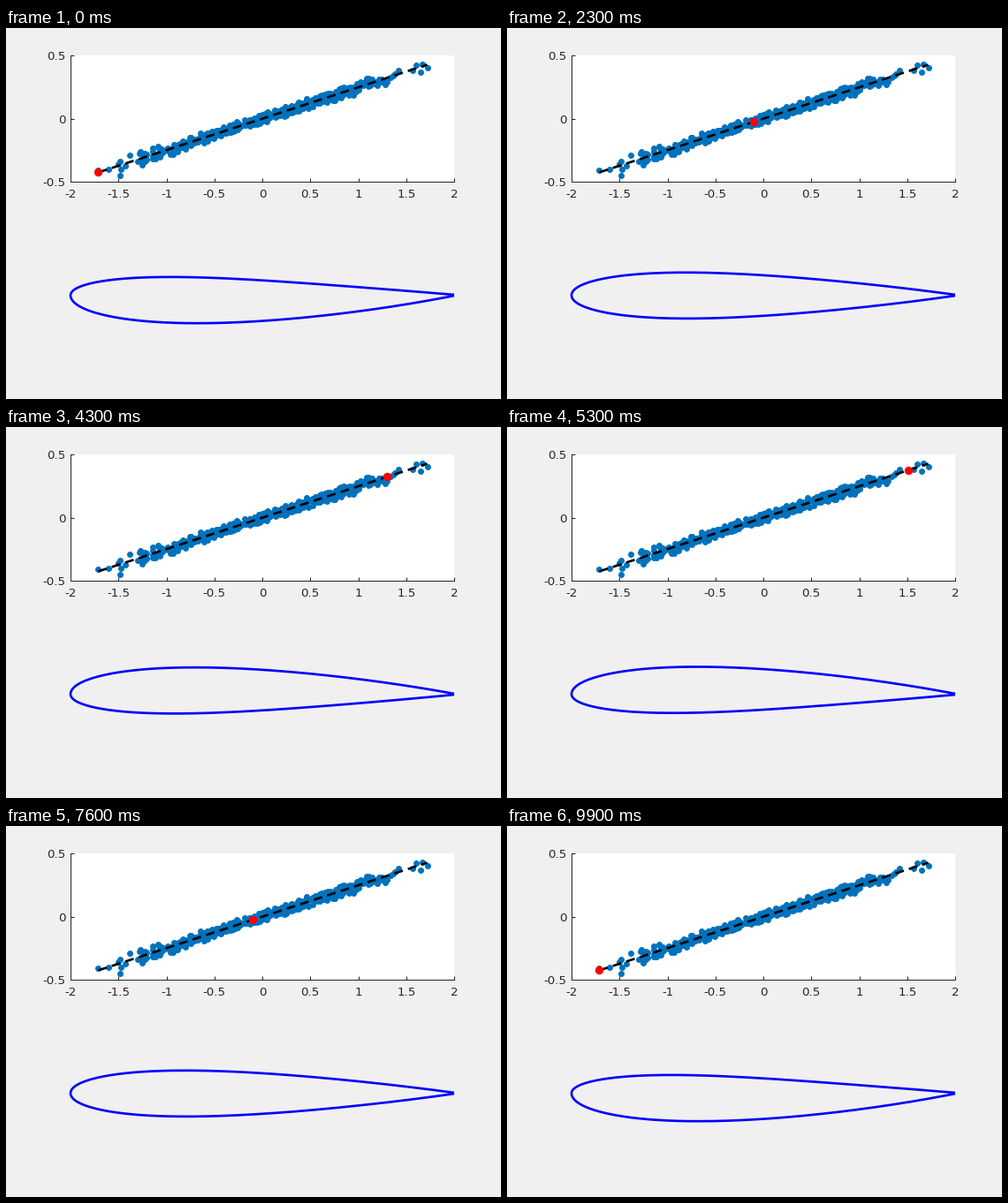
Animation of 560x420 px, one loop 10 s. Source, as a matplotlib script:

```python
import matplotlib.pyplot as plt
import numpy as np
from matplotlib.animation import FuncAnimation

W, H, DPI = 560, 420, 100
PX = 72 / DPI                      # points per pixel
LEFT, CHORD = 73, 434              # shared left edge and width of both plots
SLOPE = 0.248
STEPS = 50
INK = "#262626"

plt.rcParams["font.family"] = "DejaVu Sans"
plt.rcParams["axes.unicode_minus"] = False


def pixel_axes(top, height):
    return fig.add_axes([LEFT / W, 1 - (top + height) / H, CHORD / W, height / H])


def sample_points(count=500):
    """Bounded random cloud around the trend, thinning out towards the ends."""
    rng = np.random.default_rng(7)
    x = np.clip(1.72 * (2 * rng.beta(3, 3, count) - 1), -1.5, 1.5)
    noise = np.clip(rng.normal(0, 1, count), -2.2, 2.2) * (0.016 + 0.007 * np.abs(x))
    tips = [(-1.71, -0.41), (-1.6, -0.4), (-1.48, -0.45), (-1.48, -0.34),
            (1.57, 0.38), (1.6, 0.42), (1.65, 0.37), (1.67, 0.43), (1.72, 0.4)]
    return np.vstack([np.column_stack([x, SLOPE * x + noise]), tips]).T


def airfoil(t):
    """Closed outline of a 12 % thick section whose camber grows with t."""
    x = (1 - np.cos(np.linspace(0, np.pi, 160))) / 2
    half = 0.6 * (0.2969 * np.sqrt(x) - 0.126 * x - 0.3516 * x**2
                  + 0.2843 * x**3 - 0.1015 * x**4)
    camber = t * np.sqrt(x) * (1 - x) * (0.0137 + 0.0195 * x)
    upper, lower = camber + half, camber - half
    return np.r_[x[::-1], x[1:]], np.r_[upper[::-1], lower[1:]]


fig = plt.figure(figsize=(W / DPI, H / DPI), dpi=DPI, facecolor="#f0f0f0")

# Scatter plot with trend line
top = pixel_axes(31, 143.3)
top.set(xlim=(-2, 2), ylim=(-0.5, 0.5))
for axis, ticks in ((top.xaxis, np.linspace(-2, 2, 9)), (top.yaxis, (-0.5, 0, 0.5))):
    axis.set_ticks(ticks, [f"{v:g}" for v in ticks])
top.tick_params(direction="in", length=4.3 * PX, width=PX, color=INK,
                labelcolor=INK, labelsize=13.33 * PX)
top.tick_params(axis="x", pad=8 * PX)
top.tick_params(axis="y", pad=5.5 * PX)
top.spines[["top", "right"]].set_visible(False)
top.spines[["left", "bottom"]].set(linewidth=PX, color=INK)

top.scatter(*sample_points(), s=(7 * PX) ** 2, color="#0072bd", linewidths=0, zorder=3)
ends = np.array([-1.71, 1.72])
top.plot(ends, SLOPE * ends, color="black", lw=2.67 * PX,
         linestyle=(0, (3.75, 2.25)), dash_capstyle="butt", zorder=4)
marker, = top.plot([], [], "o", color="red", ms=9.4 * PX, mew=0, zorder=5)

# Airfoil outline, drawn at equal scale
bottom = pixel_axes(230.5, 144)
bottom.set(xlim=(0, 1), ylim=(-72 / CHORD, 72 / CHORD))
bottom.axis("off")
outline, = bottom.plot([], [], color="blue", lw=2.67 * PX, clip_on=False,
                       solid_joinstyle="round", solid_capstyle="butt")

sweep = np.linspace(*ends, STEPS)
sweep = np.r_[sweep, sweep[::-1]]


def update(i):
    t = sweep[i]
    marker.set_data([t], [SLOPE * t])
    outline.set_data(*airfoil(t))
    return marker, outline


anim = FuncAnimation(fig, update, frames=2 * STEPS, interval=100, repeat=True)
plt.show()
```
